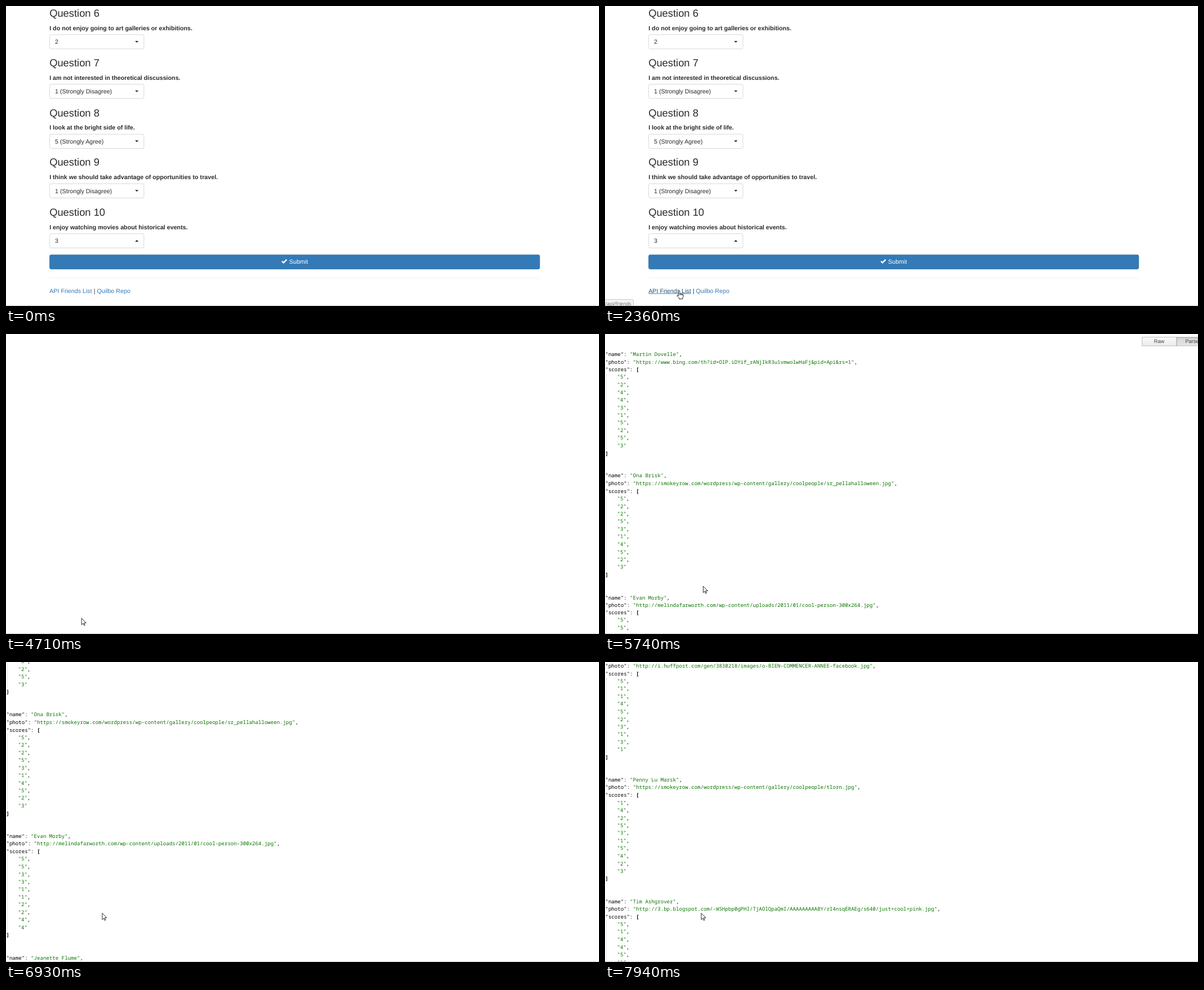
These frames come from a looping animation (1053 by 532 pixels, 8 s). An HTML page:

```html
<!DOCTYPE html>
<html lang="en">
<head>
<meta charset="utf-8">
<title>Survey</title>
<style>
  html, body { margin: 0; width: 100%; height: 100%; overflow: hidden; background: #fff; }
  #stage { position: relative; width: 1053px; height: 532px; overflow: hidden; background: #fff;
    --ink: #2a2a2a; text-rendering: geometricPrecision; }
  .page { position: absolute; left: 0; top: 0; width: 1378.3px; height: 696.3px;
    transform: scale(.764); transform-origin: 0 0;
    font: 14px/20px "Liberation Sans", Arial, sans-serif; color: var(--ink); }
  .page * { box-sizing: border-box; }
  .question { position: absolute; left: 101px; }
  h3 { margin: 0 0 10px; font-size: 24px; font-weight: 400; line-height: 27px; white-space: nowrap; }
  label { display: block; height: 25px; font-weight: 700; white-space: nowrap; }
  .select { position: relative; width: 220px; height: 34px; padding: 6px 12px; border: 1px solid #ccc; border-radius: 4px; }
  .select::after { content: ""; position: absolute; right: 12px; top: 50%; margin-top: -2px;
    border: 4px solid transparent; border-top-color: var(--ink); border-bottom: 0; }
  .select.up::after { border-bottom: 4px solid var(--ink); border-top: 0; }
  #submit { position: absolute; left: 101px; top: 576.8px; width: 1140px; height: 34px; padding: 5px 12px;
    text-align: center; color: #fff; background: #337ab7; border: 1px solid #2e6da4; border-radius: 4px; }
  #submit.hover { background: #286090; border-color: #204d74; }
  #submit svg { width: 14px; height: 14px; vertical-align: -2px; fill: #fff; }
  .rule { position: absolute; left: 101px; top: 630.8px; width: 1140px; height: 1px; background: #eee; }
  .links { position: absolute; left: 101px; top: 650.5px; white-space: nowrap; }
  .links span { color: #337ab7; }
  .links .hover { color: #23527c; text-decoration: underline; }

  #json { font: 11.92px/17.63px "Noto Sans Mono", "DejaVu Sans Mono", monospace; color: #000; white-space: pre; }
  .friend { position: absolute; left: .6px; }
  .friend i { font-style: normal; color: #0b7500; }
  .scores { margin-left: 2px; padding-left: 24.5px; border-left: 1px dotted #bbb; }
  .tab { position: absolute; top: 6.5px; width: 81px; height: 21px; border: 1px solid #aaa; text-align: center;
    font: 12.2px/19px "Liberation Sans", Arial, sans-serif; color: #444;
    background: linear-gradient(#fafafa, #ebebeb); box-shadow: 0 1px 2px #0002; }
  .tab.on { background: linear-gradient(#d6d6d6, #e4e4e4); box-shadow: inset 0 1px 2px #0003; }

  #status { position: absolute; left: -4px; top: 519.5px; width: 55px; height: 16px; box-sizing: border-box;
    padding-left: 3px; border: 1px solid #c8c8c8; border-radius: 0 3px 0 0; background: #f5f5f5;
    font: 8.6px/15px "Open Sans", "Noto Sans", sans-serif; color: #666; white-space: nowrap; }
  #edge { position: absolute; left: 0; top: 531px; width: 100%; height: 1px; background: #c9c9c9; }
  #click { position: absolute; left: 122px; top: 496px; width: 19px; height: 18px; border-radius: 50%; background: #ffff0078; }
  #cursor { position: absolute; left: 0; top: 0; overflow: visible; width: 1px; height: 1px; }
  #cursor path { fill: #fff; stroke: #000; stroke-linejoin: round; stroke-width: 1.1; }
</style>
</head>
<body>
<div id="stage">
  <div class="page" id="survey">
    <div id="submit"><svg viewBox="0 0 14 14"><path d="M.3 7.6 2.6 5.3 5 7.7 11.2 1.5 13.5 3.8 5 12.3Z"/></svg> Submit</div>
    <div class="rule"></div>
    <div class="links"><span id="api">API Friends List</span> | <span>Quilbo Repo</span></div>
  </div>
  <div class="page" id="json">
    <div class="tab" style="left:1247.5px">Raw</div>
    <div class="tab on" style="left:1327.5px">Parsed</div>
  </div>
  <div id="status">/api/friends</div>
  <div id="edge"></div>
  <div id="click"></div>
  <svg id="cursor">
    <g id="arrow" transform="scale(.764)"><path d="M.5.5V15.6L4 12.3 6.2 17.3 8.4 16.4 6.2 11.4H11Z"/></g>
    <g id="hand" transform="scale(.764) translate(-6 0)">
      <path d="M4.4 12V2a1.6 1.6 0 0 1 3.2 0V7q3-1 3 .5 3-.8 3 .7 2-.3 2 1.4V14L14 17V19H6.2V17L1.2 12q0-3 3.2-1"/>
      <path d="M7.6 7V10.5M10.6 7.5V10.5M13.4 8.2V10.8" style="fill:none"/>
    </g>
  </svg>
</div>
<script>
const LOOP = 8000, SCALE = 0.764;
const $ = id => document.getElementById(id);
const add = (id, html) => $(id).insertAdjacentHTML("beforeend", html);

const questions = [
  ["I do not enjoy going to art galleries or exhibitions.", "2"],
  ["I am not interested in theoretical discussions.", "1 (Strongly Disagree)"],
  ["I look at the bright side of life.", "5 (Strongly Agree)"],
  ["I think we should take advantage of opportunities to travel.", "1 (Strongly Disagree)"],
  ["I enjoy watching movies about historical events.", "3"],
];
questions.forEach(([text, answer], i) => add("survey",
  `<div class="question" style="top:${4 + i * 115.4}px"><h3>Question ${i + 6}</h3><label>${text}</label>` +
  `<div class="select${i === 4 ? " up" : ""}">${answer}</div></div>`));

const friends = [
  ["Martin Dovelle", "https://www.bing.com/th?id=OIP.iDYif_rANjIkR3u1vmwolwHaFj&amp;pid=Api&amp;rs=1", "5244315253"],
  ["Ona Brisk", "https://smokeyrow.com/wordpress/wp-content/gallery/coolpeople/sr_pellahalloween.jpg", "5225314523"],
  ["Evan Morby", "http://melindafarworth.com/wp-content/uploads/2011/01/cool-person-300x264.jpg", "5533112244"],
  ["Jeanette Flume", "http://i.huffpost.com/gen/3830218/images/o-BIEN-COMMENCER-ANNEE-facebook.jpg", "5114523131"],
  ["Penny Lu Marsk", "https://smokeyrow.com/wordpress/wp-content/gallery/coolpeople/tlorn.jpg", "1425315423"],
  ["Tim Ashgrover", "http://3.bp.blogspot.com/-WSHpbp0gPHI/TjAOlQpaQmI/AAAAAAAAABY/rI4nsqERAEg/s640/just+cool+pink.jpg", "5144512253"],
];
const quoted = s => `<i>"${s}"</i>`;
friends.forEach(([name, photo, scores], i) => add("json",
  `<div class="friend" style="top:${39.4 + i * 282.08}px"><div>"name": ${quoted(name)},</div>` +
  `<div>"photo": ${quoted(photo)},</div><div>"scores": <b>[</b></div>` +
  `<div class="scores">${[...scores].map(quoted).join(",\n")}</div><b>]</b></div>`));

const clamp = v => Math.min(1, Math.max(0, v));
const progress = (t, from, to) => clamp((t - from) / (to - from));
const mix = (a, b, k) => a + (b - a) * k;
const smooth = k => k * k * (3 - 2 * k);
const show = (id, on) => { $(id).style.display = on ? "" : "none"; };

// Pointer stops: up to the button, down to the link, a rest, then away.
const stops = [
  { t: 690, x: 236, y: 503 }, { t: 1000, x: 205, y: 457 }, { t: 1260, x: 205, y: 457 },
  { t: 2060, x: 132, y: 510 }, { t: 2360, x: 131.6, y: 505 }, { t: 3940, x: 134.5, y: 504 },
  { t: 5150, x: 133.5, y: 503.5 }, { t: 5740, x: 174, y: 446.8 }, { t: 6260, x: 170.6, y: 445 },
];
function pointerAt(t) {
  const next = stops.findIndex(stop => stop.t > t);
  if (next < 0) return stops.at(-1);
  const a = stops[Math.max(0, next - 1)], b = stops[next];
  const k = smooth(progress(t, a.t, b.t));
  return { x: mix(a.x, b.x, k), y: mix(a.y, b.y, k) };
}

// Steady scrolling that doubles its speed near the end, seen in coarse steps.
function scrollAt(t) {
  const step = Math.floor(t / 110) * 110;
  return 0.368 * (Math.max(0, step - 6500) + 1.029 * Math.max(0, step - 7480));
}

function draw(t) {
  const onSurvey = t < 4710;
  const { x, y } = pointerAt(t);
  const inside = (left, top, right, bottom) =>
    onSurvey && t >= stops[0].t && x > left && x < right && y > top && y < bottom;
  const onSubmit = inside(77, 441, 949, 467);
  const onLink = inside(77, 498, 153, 513);

  show("survey", onSurvey);
  show("json", t >= 5060);
  $("json").style.transform = `translateY(${-scrollAt(t)}px) scale(${SCALE})`;
  $("submit").classList.toggle("hover", onSubmit);
  $("api").classList.toggle("hover", onLink);
  $("status").style.opacity = progress(t, 1760, 2060) - progress(t, 3390, 3620);
  show("click", t >= 2540 && t < 2700);
  show("cursor", t >= stops[0].t);
  show("hand", onSubmit || onLink);
  show("arrow", !(onSubmit || onLink));
  $("cursor").style.transform = `translate(${x}px, ${y}px)`;
}

const start = performance.now();
function tick() {
  draw((performance.now() - start) % LOOP);
  requestAnimationFrame(tick);
}
tick();
</script>
</body>
</html>
```
